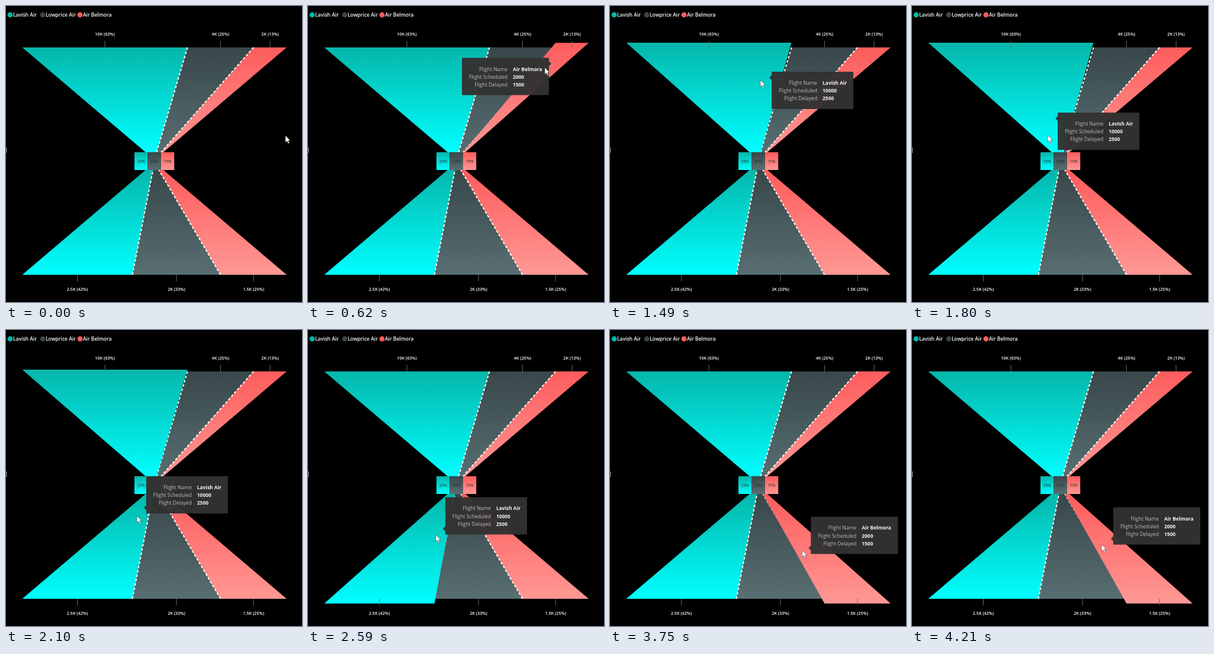
Recreate the animation shown at these times as an HTML page. Size 500 px wide and 500 px high, loop 4290 ms.

```html
<!DOCTYPE html>
<html lang="en">
<head>
<meta charset="utf-8">
<title>Flight delays</title>
<style>
  html, body { margin: 0; width: 100%; height: 100%; overflow: hidden; background: #000; }
  svg { display: block; width: 100%; height: 100%; }
  text { font-family: "Open Sans", "Noto Sans", sans-serif; fill: #fff; }
  .legend { font-size: 8.5px; font-weight: 600; }
  .label { font-size: 7.2px; font-weight: 600; text-anchor: middle; }
  .share { font-size: 6.6px; fill: #1c3033; text-anchor: middle; }
  .key { font-size: 8.5px; fill: #bcbcbc; text-anchor: end; }
  .value { font-size: 8.4px; font-weight: 700; fill: #f4f4f4; }
  .dash { stroke: #fffaf2; stroke-width: 2; stroke-dasharray: 4.5 3; }
  .tick { stroke: #666c70; stroke-width: 1; }
</style>
</head>
<body>
<svg id="stage" viewBox="0 0 500 500"></svg>
<script>
const BEAT = 78;
const BEATS = 55;
const MID = 250.75;
const OUTER = 446.5;
const NECK = 30;

const airlines = [
  { name: "Lavish Air", from: "#05b6aa", to: "#00ffff", dot: 7, planned: 10000, late: 2500, tip: 138 },
  { name: "Lowprice Air", from: "#38474a", to: "#586e72", dot: 62, planned: 4000, late: 2000, tip: 147 },
  { name: "Air Belmora", from: "#fd5c5c", to: "#ff9894", dot: 125, planned: 2000, late: 1500, tip: 147 }
];
const halves = [
  { field: "planned", outer: 70, waist: 247, dir: -1, labelY: 49.5 },
  { field: "late", outer: 454, waist: 277, dir: 1, labelY: 481 }
];
// Times in beats; each slice drops shortly before the next one rises
const hovers = [
  { half: 0, slice: 2, at: 4.5 }, { half: 0, slice: 1, at: 9.5 }, { half: 0, slice: 0, at: 16.25 },
  { half: 1, slice: 0, at: 27 }, { half: 1, slice: 1, at: 36.5 }, { half: 1, slice: 2, at: 44.5 }
];
hovers.forEach((h, i) => { h.leave = i < 5 ? hovers[i + 1].at - 1.75 : Infinity; });

// Pointer stops: beat, x, y
const stops = [
  [0, 472, 219], [6, 436, 100], [8, 400, 104], [12.4, 320, 133], [19, 254, 125],
  [21, 232, 185], [27, 221, 314], [35, 215, 352], [38.6, 270, 362],
  [47.6, 325, 373], [50, 319, 362], [53, 325, 357], [54, 320, 362]
];

const stage = document.getElementById("stage");
function set(node, attrs) {
  for (const k in attrs) node.setAttribute(k, attrs[k]);
}
function add(parent, tag, attrs = {}, text = "") {
  const node = document.createElementNS("http://www.w3.org/2000/svg", tag);
  set(node, attrs);
  node.textContent = text;
  parent.append(node);
  return node;
}
function smooth(v) {
  const u = Math.max(0, Math.min(1, v));
  return u * u * (3 - 2 * u);
}
const percent = v => Math.round(v * 100) + "%";

const defs = add(stage, "defs");
airlines.forEach((a, i) => {
  const g = add(defs, "linearGradient", { id: "fill" + i, x1: 0, y1: 0, x2: 0, y2: 1 });
  add(g, "stop", { offset: 0, "stop-color": a.from });
  add(g, "stop", { offset: 1, "stop-color": a.to });
  add(stage, "circle", { cx: a.dot, cy: 15, r: 4.4, fill: a.from });
  add(stage, "text", { x: a.dot + 5, y: 18, class: "legend" }, a.name);
});
add(stage, "rect", { x: 0, y: 239, width: 1, height: 9, fill: "#aaa" });

const [base, dashes, raised, marks] = Array.from({ length: 4 }, () => add(stage, "g"));

halves.forEach(h => {
  const total = airlines.reduce((sum, a) => sum + a[h.field], 0);
  let done = 0;
  h.slices = airlines.map((a, i) => {
    const count = a[h.field];
    const cuts = [done / total, (done + count) / total];
    const [x1, x2] = cuts.map(c => MID + (c - 0.5) * OUTER);
    const [n1, n2] = cuts.map(c => MID + (c - 0.5) * NECK);
    const x = (x1 + x2) / 2;
    done += count;
    if (i) add(dashes, "line", { x1, y1: h.outer, x2: n1, y2: h.waist, class: "dash" });
    add(marks, "line", { x1: x, y1: h.outer, x2: x, y2: h.outer + h.dir * 11, class: "tick" });
    add(marks, "text", { x, y: h.labelY, class: "label" }, `${count / 1000}K (${percent(count / total)})`);
    return { x1, x2, n1, n2, node: add(base, "polygon", { fill: `url(#fill${i})` }) };
  });
});
airlines.forEach((a, i) => {
  const x = 217 + i * 22.4;
  add(marks, "rect", { x, y: 247, width: 22.4, height: 30, fill: `url(#fill${i})` });
  add(marks, "text", { x: x + 11.2, y: 265, class: "share" }, percent(a.late / a.planned));
});

const tip = add(stage, "g");
const tipBack = add(tip, "g", { fill: "#323232", opacity: 0.97 });
const tipArrow = add(tipBack, "polygon");
const tipBox = add(tipBack, "rect", { height: 63 });
const tipText = add(tip, "g");
const values = ["Flight Name", "Flight Scheduled", "Flight Delayed"].map((key, i) => {
  const y = 22 + i * 13.2;
  add(tipText, "text", { x: 77, y, class: "key" }, key);
  return add(tipText, "text", { x: 86, y, class: "value" });
});
const pointer = add(stage, "path", {
  d: "M0 0V11.5L2.7 9L4.7 13.4L6.6 12.5L4.7 8.3H8.2Z",
  fill: "#fff", stroke: "#222", "stroke-width": 0.5
});

function pointerAt(beat) {
  const next = Math.max(1, stops.findIndex(s => s[0] >= beat));
  const [t0, x0, y0] = stops[next - 1];
  const [t1, x1, y1] = stops[next];
  const k = smooth((beat - t0) / (t1 - t0));
  return [x0 + (x1 - x0) * k, y0 + (y1 - y0) * k];
}

function drawSlices(beat) {
  halves.forEach((h, half) => h.slices.forEach((s, slice) => {
    const hover = hovers.find(v => v.half === half && v.slice === slice);
    const lift = 8 * (smooth((beat - hover.at) / 2.5) - smooth((beat - hover.leave) / 3));
    const y = h.outer + h.dir * lift;
    set(s.node, { points: `${s.x1},${y} ${s.x2},${y} ${s.n2},${h.waist} ${s.n1},${h.waist}` });
    (lift > 0 ? raised : base).append(s.node);
  }));
}

// The tooltip trails the pointer by one beat
function drawTip(beat) {
  const hover = hovers.filter(h => h.at + 1 <= beat).pop();
  set(tip, { visibility: hover ? "visible" : "hidden" });
  if (!hover) return;
  const a = airlines[hover.slice];
  const [px, py] = pointerAt(beat - 1);
  const x = px + 11, y = py - 4.5;
  const side = x > 400 ? -1 : 1;
  const left = side < 0 ? x - 22 - a.tip : Math.min(x + 4, 500 - a.tip);
  const top = y > 250 ? y - 53 : y - 10;
  const tail = side < 0 ? left + a.tip + 4 : x;
  set(tipBox, { x: left, y: top, width: a.tip });
  set(tipArrow, { points: `${tail},${y} ${tail + side * 5},${y - 5} ${tail + side * 5},${y + 5}` });
  set(tipText, { transform: `translate(${left} ${top})` });
  [a.name, a.planned, a.late].forEach((v, i) => { values[i].textContent = v; });
}

let shown = -1;
const start = performance.now();
function frame() {
  const now = (performance.now() - start) % (BEAT * BEATS);
  const beat = Math.min(BEATS - 1, Math.floor((now + 8) / BEAT));
  if (beat !== shown) {
    shown = beat;
    drawSlices(beat);
    drawTip(beat);
    set(pointer, { transform: `translate(${pointerAt(beat)})` });
  }
  requestAnimationFrame(frame);
}
frame();
</script>
</body>
</html>
```
